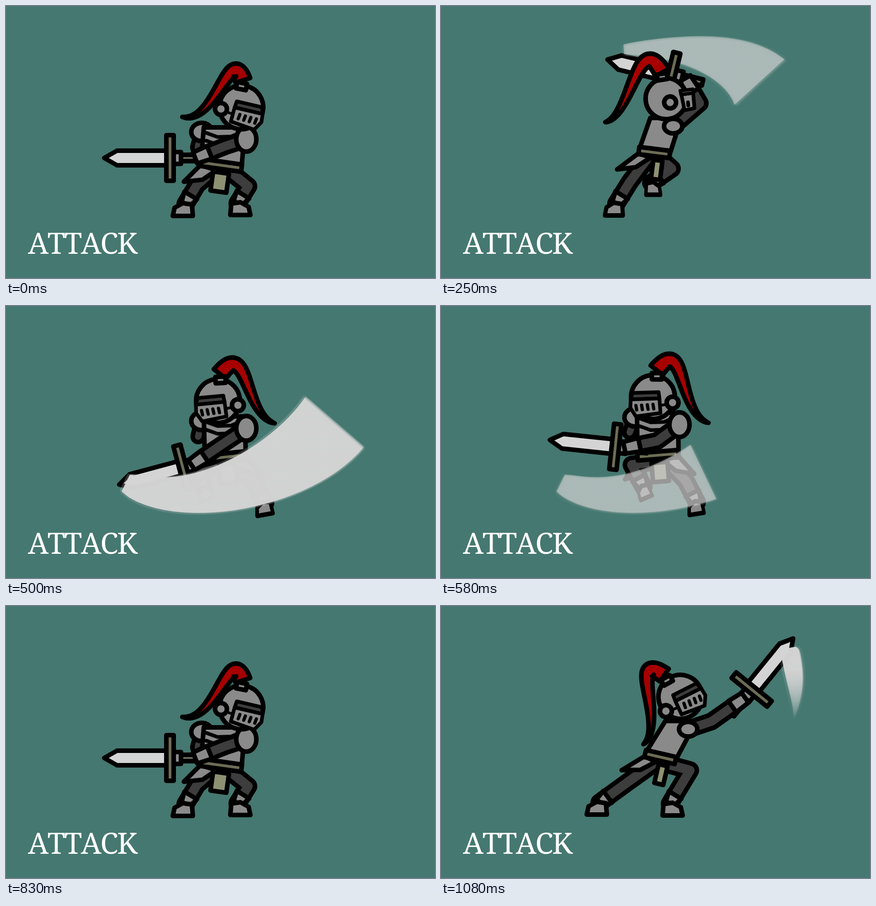
Animation, 939 px wide and 596 px high, one loop 1160 ms. Source, as an HTML page with a canvas:

```html
<!DOCTYPE html>
<html lang="en">
<head>
<meta charset="utf-8">
<title>Attack</title>
<style>
html, body { margin: 0; width: 100%; height: 100%; overflow: hidden; background: #457870; }
canvas { display: block; }
p { position: absolute; left: 48px; top: 475px; margin: 0; color: #fff;
  font: 64px/87px "Noto Serif", serif; letter-spacing: -2.6px; font-kerning: none; }
</style>
</head>
<body>
<canvas width="939" height="596"></canvas>
<p>ATTACK</p>
<script>
const ctx = document.querySelector('canvas').getContext('2d');
const STEEL = '#8a8a8a', DARK = '#3d3d3d', BELT = '#6c6d55', CLOTH = '#8e9272', RED = '#a70000', BLADE = '#d4d4d4';
const LINE = 10, LOOP = 1160, STEPS = 14;

// Joints of each key pose. head, hip and sword: x, y, angle; feet: x, y, angle, toe direction.
// plume: two points on its spine and the tip; grip: distance of the hand behind the guard.
const windUp = {
  side: 1, front: 1, turned: 0, head: [515, 222, 15], plume: [488, 150, 446, 211, 386, 243],
  chest: [478, 266], hip: [471, 349, 8], elbow: [480, 307], sword: [359, 333, 180], grip: 55,
  kneeL: [418, 392], footL: [387, 460, 0, -1], kneeR: [530, 395], footR: [513, 458, 0, 1]
};
const liftA = {
  side: 1, front: 0, turned: 1, head: [500, 207, 0], plume: [452, 130, 412, 195, 360, 247],
  chest: [505, 250], hip: [466, 325, 12], elbow: [578, 225], sword: [522, 154, 206], grip: 35,
  kneeL: [405, 390], footL: [376, 459, 0, -.9], kneeR: [505, 362], footR: [469, 436, 0, .9]
};
const liftB = {
  side: 1, front: 0, turned: 1, head: [482, 197, -12], plume: [424, 125, 396, 205, 359, 266],
  chest: [473, 238], hip: [468, 315, 0], elbow: [549, 195], sword: [478, 147, 175], grip: 25,
  kneeL: [425, 380], footL: [382, 459, 0, -.9], kneeR: [505, 348], footR: [458, 380, 0, .5]
};
const chop = {
  side: -1, front: 1, turned: 0, head: [464, 208, -7.5], plume: [512, 137, 541, 203, 588, 257],
  chest: [478, 242], hip: [480, 331, -6], elbow: [478, 300], sword: [387, 354, 165], grip: 20,
  kneeL: [420, 350], footL: [440, 425, -20, -.7], kneeR: [540, 385], footR: [567, 457, -10, -.8]
};
const hop = {
  side: -1, front: 1, turned: 0, head: [464, 191, 0], plume: [519, 122, 540, 195, 583, 255],
  chest: [470, 226], hip: [470, 323, -3], elbow: [468, 292], sword: [376, 263, 207], grip: 20,
  kneeL: [415, 346], footL: [459, 415, -26, -.6], kneeR: [532, 382], footR: [552, 454, -8, -.7]
};
const sweep = {
  side: 1, front: 0, turned: 0, head: [525, 205, -8], plume: [463, 148, 453, 212, 414, 280],
  chest: [507, 250], hip: [488, 328, 0], elbow: [590, 285], sword: [665, 245, -28], grip: 20,
  kneeL: [405, 380], footL: [346, 457, 0, -1], kneeR: [545, 365], footR: [521, 458, 0, 1]
};
const thrust = {
  side: 1, front: 0, turned: 0, head: [524, 199, -25], plume: [451, 155, 459, 232, 443, 303],
  chest: [525, 252], hip: [480, 331, 13], elbow: [592, 253], sword: [680, 183, -51], grip: 23,
  kneeL: [410, 385], footL: [341, 457, 0, -1], kneeR: [545, 360], footR: [507, 459, 0, 1]
};

const lerp = (a, b, t) => a + (b - a) * t;
const mix = (a, b, t) => Object.fromEntries(Object.keys(a).map(key =>
  [key, a[key].map ? a[key].map((v, i) => lerp(v, b[key][i], t)) : lerp(a[key], b[key], t)]));

const poses = [
  windUp, sweep, liftA, mix(liftA, liftB, .4), mix(liftA, liftB, .8), liftB, chop,
  mix(chop, hop, .5), hop, mix(chop, hop, .65), windUp, sweep, mix(sweep, thrust, .55), thrust
];

// spine: four evenly spaced points; peak: swell of the middle; head: half width at the blade.
const sweepTrail = { spine: [[243, 302], [470, 357], [700, 325], [745, 200]], peak: 18, head: 58, skew: 1, fade: .02 };
const liftTrail = { spine: [[415, 403], [690, 315], [690, 160], [400, 95]], peak: 75, head: 17, skew: 1, fade: .02, alpha: .9 };
const chopTrail = { spine: [[525, 83], [745, 200], [560, 370], [262, 388]], peak: 72, head: 32, skew: .7, fade: .02 };
const echo = trail => ({ ...trail, from: .65, alpha: .5 });
const trails = {
  1: sweepTrail, 2: liftTrail, 3: echo(liftTrail), 6: chopTrail, 7: echo(chopTrail),
  8: { spine: [[308, 358], [302, 315], [293, 268], [289, 225]], peak: 8, head: 40, skew: 1, fade: .6 },
  11: sweepTrail, 12: echo(sweepTrail),
  13: { spine: [[771, 252], [776, 195], [771, 140], [762, 92]], peak: 6, head: 22, skew: 1, fade: .7 }
};

const along = ([x, y], degrees, length) =>
  [x + Math.cos(degrees * Math.PI / 180) * length, y + Math.sin(degrees * Math.PI / 180) * length];

function towards(a, b, length) {
  const t = length / Math.hypot(b[0] - a[0], b[1] - a[1]);
  return [lerp(a[0], b[0], t), lerp(a[1], b[1], t)];
}

function trace(points) {
  ctx.beginPath();
  points.forEach(point => ctx.lineTo(...point));
}

function ink(color, width = LINE) {
  ctx.fillStyle = color;
  ctx.fill();
  ctx.lineWidth = width;
  ctx.stroke();
}

function shape(color, points, width) {
  trace(points);
  ctx.closePath();
  ink(color, width);
}

function oval(color, x, y, rx, ry = rx, width = LINE) {
  ctx.beginPath();
  ctx.ellipse(x, y, rx, ry, 0, 0, 7);
  ink(color, width);
}

function stroke(points, width) {
  trace(points);
  ctx.lineWidth = width;
  ctx.stroke();
}

// Tapered block from a to b.
function bar(color, a, b, startWidth, endWidth = startWidth) {
  const angle = Math.atan2(b[1] - a[1], b[0] - a[0]) * 180 / Math.PI + 90;
  shape(color, [along(a, angle, startWidth / 2), along(b, angle, endWidth / 2),
    along(b, angle, -endWidth / 2), along(a, angle, -startWidth / 2)]);
}

// Bent tube with an outline.
function limb(color, points, width) {
  stroke(points, width + LINE);
  ctx.strokeStyle = color;
  stroke(points, width - LINE);
  ctx.strokeStyle = '#000';
}

function placed([x, y, angle], side, draw) {
  ctx.save();
  ctx.translate(x, y);
  ctx.rotate(angle * Math.PI / 180);
  ctx.scale(side, 1);
  draw();
  ctx.restore();
}

// Outline of a band around the cubic through four evenly spaced points.
function ribbon(spine, halfWidth, from = 0) {
  const at = u => [0, 1].map(axis => spine.reduce((sum, point, i) =>
    sum + point[axis] * spine.reduce((product, _, j) => j === i ? product : product * (3 * u - j) / (i - j), 1), 0));
  const left = [], right = [];
  for (let i = 0; i <= 48; i++) {
    const u = lerp(from, 1, i / 48), a = at(u - .005), b = at(u + .005);
    const angle = Math.atan2(b[1] - a[1], b[0] - a[0]) * 180 / Math.PI + 90;
    left.push(along(at(u), angle, halfWidth(u)));
    right.unshift(along(at(u), angle, -halfWidth(u)));
  }
  return [...left, ...right];
}

function plume({ head, side, turned, plume: [ax, ay, bx, by, tipX, tipY] }) {
  const turn = head[2] * Math.PI / 180, x = turned ? -4 : -12 * side, y = -58;
  const base = [head[0] + x * Math.cos(turn) - y * Math.sin(turn), head[1] + x * Math.sin(turn) + y * Math.cos(turn)];
  shape(RED, ribbon([base, [ax, ay], [bx, by], [tipX, tipY]], u => 17 * (1 - u) ** .75));
}

function helmet() {
  oval(STEEL, 0, 0, 48);
  shape(DARK, [[-13, -10], [44, -12], [49, 2], [-14, 4]], 8);
  shape(STEEL, [[-14, 4], [49, 2], [51, 20], [40, 40], [-14, 36]], 8);
  for (let i = 0; i < 4; i++) stroke([[1 + i * 12.5, 16], [i * 12.5, 26]], 7);
  stroke([[-30, 18], [-16, 19]], 6);
  oval(STEEL, -42, 15, 13);
  bar(STEEL, [-12, -52], [-11, -38], 22);
}

function turnedHelmet() {
  oval(STEEL, 0, 0, 45);
  shape(STEEL, [[34, -6], [60, -8], [60, 26], [38, 29]], 8);
  shape(DARK, [[32, -15], [60, -16], [60, -7], [33, -6]], 7);
  stroke([[47, 12], [47, 19]], 8);
  oval(STEEL, 8, 9, 13);
  bar(STEEL, [-5, -55], [-4, -42], 22);
}

function leg(top, knee, foot) {
  const [x, y, angle, side] = foot;
  const ankle = along([x - 6 * side, y], angle - 90, 26);
  limb(DARK, [top, knee, ankle], 30);
  bar(STEEL, ankle, towards(ankle, knee, 22), 20, 32);
  placed(foot, side, () => shape(STEEL, [[-22, 0], [22, 0], [18, -18], [0, -28], [-20, -25]]));
}

const plate = (width, s) =>
  shape(STEEL, [[s * width / 2, 6], [s * width * .1, 12], [s * 36, 37], [s * 76, 47]]);

function drawTrail({ spine, peak, head, skew, fade, from, alpha = .98 }, seed) {
  const random = () => (seed = seed * 16807 % 2147483647) / 2147483647;
  const outline = ribbon(spine, u => {
    const v = Math.min(1, Math.max(0, u));
    return peak * Math.sin(Math.PI * v ** skew) ** 1.5 + head * v * Math.sqrt(1 - v ** 24 * .6);
  }, from);
  const shade = ctx.createLinearGradient(...spine[0], ...spine[3]);
  shade.addColorStop(0, BLADE + '00');
  shade.addColorStop(fade, BLADE);
  ctx.save();
  ctx.fillStyle = shade;
  ctx.globalAlpha = alpha;
  trace(outline);
  ctx.fill();
  // Faint shifted copies leave a dry brush edge.
  ctx.globalAlpha = .09 * alpha;
  for (let i = 0; i < 12; i++) {
    const dx = random() * 12 - 5, dy = random() * 9 - 4;
    trace(outline.map(([x, y]) => [x + dx, y + dy]));
    ctx.fill();
  }
  ctx.restore();
}

function knight(pose, swipe) {
  const { side, front, turned, head, chest, hip, elbow, sword, grip } = pose;
  const width = front ? 90 : 68;
  const shoulder = front ? [chest[0] + 48, chest[1] + 26] : [chest[0] + 16, chest[1] + 18];
  const farShoulder = [chest[0] - width * .55, chest[1] + 10];
  const hand = along(sword, sword[2], -grip);
  const wrist = towards(hand, elbow, 34);

  placed(sword, 1, () => shape(BLADE, [[0, -16], [116, -16], [144, 0], [116, 16], [0, 16]]));

  if (front) {
    limb(DARK, [farShoulder, towards(farShoulder, hand, 35)], 24);
    oval(STEEL, ...farShoulder, 23, 20);
    placed(hip, 1, () => plate(width, side));
  }
  leg([hip[0] + width / 4, hip[1] + 16], pose.kneeR, pose.footR);
  leg([hip[0] - width / 4, hip[1] + 16], pose.kneeL, pose.footL);
  if (turned) swipe();

  shape(STEEL, [along(hip, hip[2], -width / 2), along(hip, hip[2], width / 2),
    [chest[0] + width / 2, chest[1]], [chest[0] - width / 2, chest[1]]]);
  if (front) {
    for (const drop of [12, 29]) {
      stroke([[chest[0] - 40, chest[1] + drop], [chest[0] - 15, chest[1] + drop + 9],
        [chest[0] + 15, chest[1] + drop + 8], [chest[0] + 38, chest[1] + drop - 2]], 8);
    }
  }
  placed(hip, 1, () => {
    plate(width, -side);
    bar(CLOTH, [front ? 2 : 10, 16], [front ? 2 : 10, 58], front ? 35 : 20);
    bar(BELT, [-width / 2, 0], [width / 2, 0], 16);
  });

  bar(BELT, sword, along(sword, sword[2], -70), 14);
  bar(STEEL, along(sword, sword[2], -4), along(sword, sword[2], -24), 26);
  limb(DARK, [shoulder, elbow, wrist], 29);
  bar(STEEL, wrist, hand, 30, 26);
  oval(STEEL, ...shoulder, front ? 22 : 20, front ? 27 : 16);
  placed(sword, 1, () => bar(BELT, [0, -50], [0, 50], 16));

  plume(pose);
  placed(head, side, turned ? turnedHelmet : helmet);
  if (!turned) swipe();
}

function draw(step) {
  ctx.fillStyle = '#457870';
  ctx.fillRect(0, 0, 939, 596);
  ctx.strokeStyle = '#000';
  ctx.lineJoin = ctx.lineCap = 'round';
  knight(poses[step], () => trails[step] && drawTrail(trails[step], step * 97 + 5));
}

// Steps begin on whole hundredths of a second.
const begins = step => Math.round((step * LOOP / STEPS + .8) / 10) * 10;
const origin = performance.now();
function tick() {
  const time = (performance.now() - origin) % LOOP;
  let step = STEPS - 1;
  while (begins(step) > time) step--;
  draw(step);
  requestAnimationFrame(tick);
}
tick();
</script>
</body>
</html>
```
